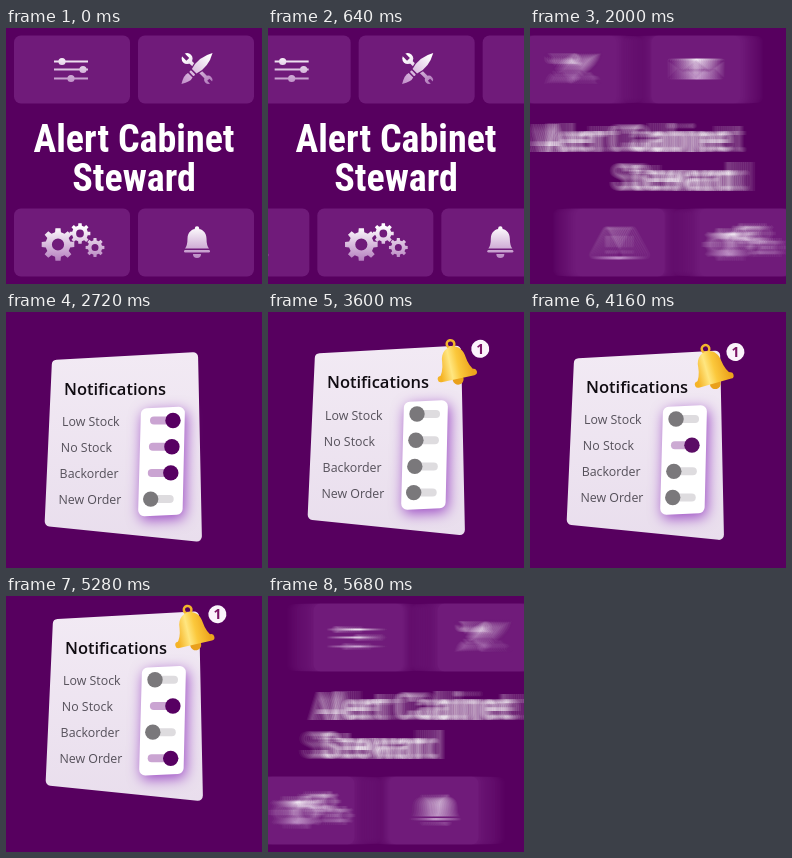
Recreate the animation shown at these times as an HTML page with a canvas. Size 256 by 256 pixels, loop 5.76 s.

```html
<!DOCTYPE html>
<html lang="en">
<head>
<meta charset="utf-8">
<title>Alert Cabinet Steward</title>
<style>
  html, body { margin: 0; width: 100%; height: 100%; overflow: hidden; background: #57005f; }
  canvas { display: block; width: 100vw; height: 100vh; }
</style>
</head>
<body>
<canvas id="stage" width="256" height="256"></canvas>
<script>
const LOOP = 5760, STEP = 80, TAU = Math.PI * 2;
const BACK = '#57005f', TILE = '#701b7a', PITCH = 124;
const stage = document.getElementById('stage').getContext('2d');
const layer = document.createElement('canvas');
layer.width = layer.height = 256;
const soft = layer.getContext('2d');
let g = stage;

const clamp = v => Math.max(0, Math.min(1, v));
const mix = (a, b, p) => a + (b - a) * p;
const smooth = p => p * p * (3 - 2 * p);

function mixRgb(a, b, p) {
  return `rgb(${a.map((v, i) => Math.round(mix(v, b[i], p)))})`;
}
function shade(y0, y1, top, bottom) {
  const fill = g.createLinearGradient(0, y0, 0, y1);
  fill.addColorStop(0, top);
  fill.addColorStop(1, bottom);
  return fill;
}
function disc(x, y, r, color) {
  if (color) g.fillStyle = color;
  g.beginPath();
  g.arc(x, y, r, 0, TAU);
  g.fill();
}
function box(x, y, w, h, r, color) {
  if (color) g.fillStyle = color;
  g.beginPath();
  g.roundRect(x, y, w, h, r);
  g.fill();
}
function line(...points) {
  g.beginPath();
  points.forEach(([x, y]) => g.lineTo(x, y));
  g.stroke();
}
function roundPoly(points, r) {
  const [a, b] = [points[0], points[points.length - 1]];
  g.beginPath();
  g.moveTo((a[0] + b[0]) / 2, (a[1] + b[1]) / 2);
  points.forEach((p, i) => g.arcTo(...p, ...points[(i + 1) % points.length], r));
  g.closePath();
}
function text(str, x, y, font, color, align = 'left') {
  g.font = font;
  g.fillStyle = color;
  g.textAlign = align;
  g.fillText(str, x, y);
}
function at(x, y, angle, draw) {
  g.save();
  g.translate(x, y);
  g.rotate(angle);
  draw();
  g.restore();
}

// Tile icons, each drawn around its tile's centre
function gear(x, y, r, teeth) {
  g.beginPath();
  for (let i = 0; i < teeth; i++) {
    [[-.3, .76], [-.2, 1], [.2, 1], [.3, .76]].forEach(([da, k]) => {
      const a = (i + da) / teeth * TAU;
      g.lineTo(x + Math.cos(a) * r * k, y + Math.sin(a) * r * k);
    });
  }
  g.closePath();
  g.moveTo(x + r * .37, y);
  g.arc(x, y, r * .37, 0, TAU, true);
  g.fill('evenodd');
}
const icons = {
  sliders() {
    g.lineWidth = 2;
    [[-8, -10], [0, 11], [9, -1]].forEach(([y, x]) => {
      line([-18, y], [16, y]);
      disc(x, y, 3.6);
    });
  },
  tools() {
    at(1, -1, -Math.PI / 4, () => {
      g.lineWidth = 3.5;
      line([0, -10], [0, 15]);
      disc(0, -14, 5.5);
      disc(0, 16, 4);
      box(-2, -21, 4, 8, 0, TILE);
      box(-1.5, 16, 3, 5, 0);
    });
    at(1, -1, Math.PI / 4, () => {
      g.lineWidth = 2.5;
      g.strokeStyle = TILE;
      g.fillStyle = shade(-18, 20, '#fff', '#c493cc');
      g.beginPath();
      g.moveTo(0, -22);
      g.quadraticCurveTo(7.5, -9, 3.2, 4);
      g.lineTo(-3.2, 4);
      g.quadraticCurveTo(-7.5, -9, 0, -22);
      g.stroke();
      g.fill();
      box(-3.2, 5.5, 6.4, 2.5, 1);
      g.beginPath();
      g.moveTo(-3.2, 9.5);
      g.quadraticCurveTo(-5, 14, 0, 22);
      g.quadraticCurveTo(5, 14, 3.2, 9.5);
      g.fill();
    });
  },
  mail() {
    box(-15, -11, 31, 21, 2);
    g.strokeStyle = TILE;
    g.lineWidth = 1.6;
    line([-14, -9], [.5, 2], [15, -9]);
    line([-14, 9], [-4, -1]);
    line([15, 9], [5, -1]);
  },
  gears() {
    gear(-14, 2, 16.5, 8);
    gear(8, -9, 10.5, 8);
    gear(23, 5, 9.5, 8);
  },
  bell() {
    disc(1, -14, 2.2);
    g.beginPath();
    g.moveTo(-11, 6);
    g.quadraticCurveTo(-8.5, 3, -8.5, -4);
    g.bezierCurveTo(-8.5, -17, 10.5, -17, 10.5, -4);
    g.quadraticCurveTo(10.5, 3, 13, 6);
    g.fill();
    box(-12, 7.5, 26, 2.5, 1.2);
    g.beginPath();
    g.arc(1, 11.5, 4, 0, Math.PI);
    g.fill();
  },
  warning() {
    g.lineWidth = 3;
    roundPoly([[-1, -18], [17.5, 15.5], [-19.5, 15.5]], 3);
    g.stroke();
    box(-2.7, -7, 3.4, 12, 1.5);
    disc(-1, 9.5, 2.1);
  }
};
function tile(name, x, y) {
  box(x, y, 116, 68, 7, TILE);
  at(x + 58, y + 34, 0, () => {
    g.fillStyle = g.strokeStyle = shade(-16, 22, '#fff', '#ac70b7');
    icons[name]();
  });
}

function titleScene(scroll, slide) {
  const left = 8 - scroll - slide, right = 8 + scroll + slide;
  g.fillStyle = BACK;
  g.fillRect(0, 0, 256, 256);
  ['sliders', 'tools', 'mail'].forEach((n, i) => tile(n, left + PITCH * i, 7.5));
  ['warning', 'gears', 'bell'].forEach((n, i) => tile(n, right + PITCH * (i - 1), 180.5));
  const font = 'bold 38px "Roboto Condensed", Roboto, "Liberation Sans", sans-serif';
  text('Alert Cabinet', 128 - slide, 123.5, font, '#fff', 'center');
  text('Steward', 128 + slide, 162.5, font, '#fff', 'center');
}

// Signed sideways throw: enters before 0, leaves after 1920
function slideAt(t) {
  if (t > 1920) return 420 * ((t - 1920) / 240) ** 2.7;
  return t < 0 ? -420 * (-t / 240) ** 2.7 : 0;
}
function drawTitle(t) {
  const scroll = PITCH * clamp(t / 1920);
  if (t >= 0 && t <= 1920) return titleScene(scroll, 0);
  const samples = 16;
  g = soft;
  for (let i = 0; i < samples; i++) {
    titleScene(scroll, slideAt(t + mix(-18, 18, i / (samples - 1))));
    stage.globalAlpha = 1 / (i + 1);
    stage.drawImage(layer, 0, 0);
  }
  stage.globalAlpha = 1;
  g = stage;
}

// time, x, y of the floating card
const drift = [
  [2240, -1, 6.5], [2720, -1, 6.5], [2900, -1, 8], [3600, 0, 0],
  [4200, -3, 5], [4720, -3, -4], [5020, 0, 3], [LOOP, 0, 3]
];
function cardOffset(t) {
  const i = drift.findIndex(k => k[0] > t);
  const [a, b] = [drift[i - 1], drift[i]];
  const p = smooth((t - a[0]) / (b[0] - a[0]));
  const rise = 235 * clamp((2720 - t) / 480) ** 3;
  const leave = 270 * clamp((t - 5100) / 420) ** 3;
  return [mix(a[1], b[1], p), mix(a[2], b[2], p) + rise - leave];
}

// label and the times at which its switch flips
const rows = [
  ['Low Stock', 0, 3000],
  ['No Stock', 0, 3120, 4000],
  ['Backorder', 0, 3240],
  ['New Order', 4400]
];
function toggle(x, y, p) {
  box(x - 4, y - 4, 27, 8, 4, mixRgb([222, 220, 223], [202, 164, 210], p));
  disc(x + 19 * p, y, 7.7, mixRgb([122, 120, 123], [87, 0, 98], p));
}
function alarm(t) {
  const p = clamp((t - 2980) / 320) - 1;
  if (p <= -1) return;
  const size = 1 + 2.7 * p ** 3 + 1.7 * p ** 2;
  const swing = Math.sin((t - 3550) / 700 * TAU);
  const angle = (-13.5 + 3 * swing) * Math.PI / 180;
  at(181 + 3.5 * swing, 32, angle, () => {
    g.scale(size, size);
    disc(0, 36, 5.5, '#e9a01c');
    g.lineWidth = 2.5;
    g.strokeStyle = '#f4b52c';
    g.beginPath();
    g.arc(0, 0, 3.8, 0, TAU);
    g.stroke();
    const gold = g.createLinearGradient(-16, 0, 16, 0);
    gold.addColorStop(0, '#f5b325');
    gold.addColorStop(.35, '#ffe680');
    gold.addColorStop(.6, '#fbc83c');
    gold.addColorStop(1, '#eda51d');
    g.fillStyle = gold;
    g.beginPath();
    g.moveTo(-19, 32);
    g.quadraticCurveTo(-13, 26, -12, 16);
    g.bezierCurveTo(-11, -2, 11, -2, 12, 16);
    g.quadraticCurveTo(13, 26, 19, 32);
    g.fill();
    box(-20, 29, 40, 6.5, 3.2);
    disc(28, 11, 9, '#fbf3fb');
    at(28, 11, -angle, () =>
      text('1', 0, 5, 'bold 14px "Open Sans", sans-serif', '#7b1465', 'center'));
  });
}
function drawCard(t) {
  g.fillStyle = BACK;
  g.fillRect(0, 0, 256, 256);
  if (t < 2320 || t >= 5520) return;
  at(...cardOffset(t), 0, () => {
    roundPoly([[47, 41.5], [193, 33.5], [197, 223.5], [39.5, 207.5]], 5);
    g.fillStyle = shade(36, 223, '#f2eaf4', '#e9deed');
    g.fill();

    g.save();
    g.shadowColor = '#9b49c4';
    g.shadowBlur = 14;
    g.shadowOffsetX = 2;
    g.shadowOffsetY = 4;
    roundPoly([[136, 90], [180, 88], [177.5, 196], [133, 198]], 6);
    g.fillStyle = '#fff';
    g.fill();
    g.restore();

    text('Notifications', 59, 76, '600 16.5px "Open Sans", "Noto Sans", sans-serif', '#100c12');
    rows.forEach(([label, ...flips], i) => {
      text(label, 57 - 1.2 * i, 107.5 + 26 * i, '12.4px "Open Sans", "Noto Sans", sans-serif', '#55505a');
      const on = flips.reduce((sum, start, n) =>
        sum + (n % 2 ? -1 : 1) * smooth(clamp((t - start) / 200)), 0);
      toggle(149 - 1.1 * i, 102 + 26.2 * i, on);
    });
    alarm(t);
  });
}

function frame(now) {
  const t = Math.floor(now % LOOP / STEP) * STEP;
  if (t < 2160) drawTitle(t);
  else if (t > 5520) drawTitle(t - LOOP);
  else drawCard(t);
  requestAnimationFrame(frame);
}
frame(0);
</script>
</body>
</html>
```
